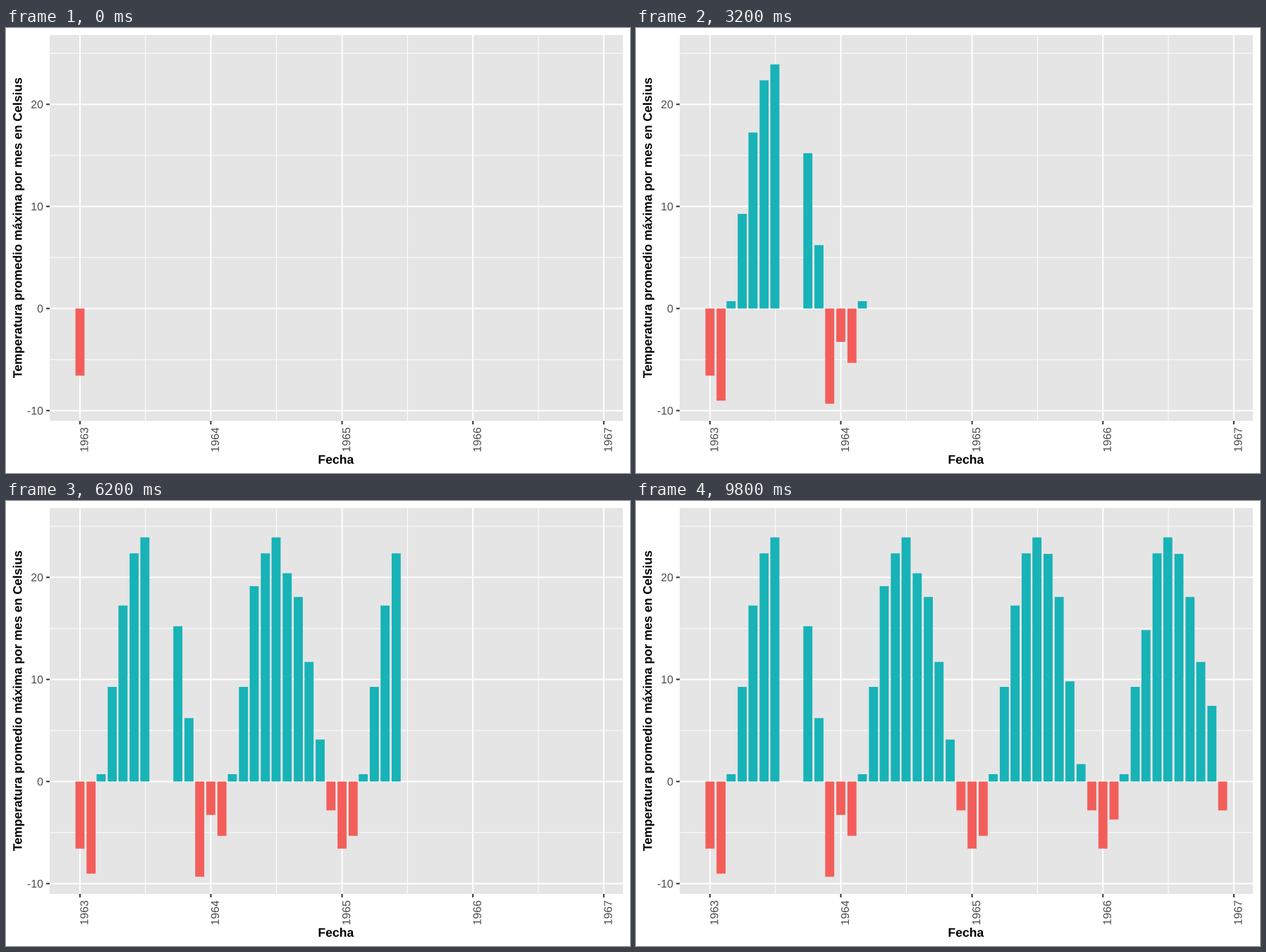
A matplotlib script for the animation above (10 s loop, 885 px wide and 632 px high).

```python
import matplotlib.pyplot as plt
import numpy as np
from matplotlib.animation import FuncAnimation
from matplotlib.patches import PathPatch, Rectangle
from matplotlib.textpath import TextPath
from matplotlib.transforms import Affine2D

W, H, DPI = 885, 632, 100
PT = 72 / DPI  # points per pixel
STEP, LOOP = 100, 10000  # ms

LEFT, RIGHT, TOP, BOTTOM = 62, 875, 10, 558
ZERO, DEGREE = 398.4, 14.5
X0, DAY = 104.9, 0.5085
BAR = 0.9 * 28 * DAY

PANEL, WARM, COLD = "#E5E5E5", "#17B3B7", "#F35E5A"
TICK, LABEL = "#333333", "#4D4D4D"

MISSING = ("1963-08", "1963-09")
# Months clearly off the seasonal curve, in degrees.
ANOMALIES = {
    "1963-02": -3.7, "1963-10": 3.5, "1963-11": 2.1, "1963-12": -6.5,
    "1964-01": 3.3, "1964-05": 1.9, "1964-08": -1.9, "1965-10": -1.9,
    "1965-11": -2.4, "1966-02": 1.6, "1966-05": -2.4, "1966-11": 3.3,
}

fig = plt.figure(figsize=(W / DPI, H / DPI), dpi=DPI, facecolor="white")
ax = fig.add_axes([0, 0, 1, 1])
ax.set_xlim(0, W)
ax.set_ylim(H, 0)
ax.axis("off")


def x_of(date):
    days = np.datetime64(date, "D") - np.datetime64("1963-01-01")
    return X0 + days.astype(int) * DAY


def y_of(temp):
    return ZERO - temp * DEGREE


def season(k):
    """Yearly cycle of the maximum, k months after a January."""
    a = 2 * np.pi * k / 12
    return 9.58 - 15.29 * np.cos(a - 0.08) - 1.17 * np.cos(2 * a - 0.68)


def line(xs, ys, width, color="white"):
    ax.plot(xs, ys, color=color, lw=width * PT, solid_capstyle="butt",
            snap=False, zorder=2)


def text(x, y, s, size, color="black", weight="normal", align=0.5, angle=0):
    """Draw s on a baseline; align 0.5 centres its ink on (x, y), 1 ends it there."""
    path = TextPath((0, 0), s, size=size,
                    prop={"family": "Liberation Sans", "weight": weight})
    ink = path.get_extents()
    place = (Affine2D().translate(-ink.x0 - align * ink.width, 0)
             .scale(1, -1).rotate_deg(-angle).translate(x, y))
    ax.add_patch(PathPatch(path, transform=place + ax.transData,
                           facecolor=color, lw=0, snap=False, zorder=4))


def box(x, y, w, h, color, zorder):
    return ax.add_patch(Rectangle((x, y), w, h, facecolor=color, lw=0,
                                  snap=False, zorder=zorder))


box(LEFT, TOP, RIGHT - LEFT, BOTTOM - TOP, PANEL, 1)

years = range(1963, 1968)
ticks = [x_of(f"{year}-01-01") for year in years]

for temp in range(-5, 26, 10):
    line([LEFT, RIGHT], [y_of(temp)] * 2, 1)
for a, b in zip(ticks, ticks[1:]):
    line([(a + b) / 2] * 2, [TOP, BOTTOM], 1)

for temp in range(-10, 21, 10):
    y = y_of(temp)
    line([LEFT, RIGHT], [y, y], 2)
    line([LEFT - 5, LEFT], [y, y], 2, TICK)
    text(52.3, y + 5.6, str(temp), 15.9, LABEL, align=1)
for year, x in zip(years, ticks):
    line([x, x], [TOP, BOTTOM], 2)
    line([x, x], [BOTTOM, BOTTOM + 5], 2, TICK)
    text(x + 11.5, 584.5, str(year), 15.9, LABEL, angle=90)

text((LEFT + RIGHT) / 2, 618.8, "Fecha", 17.6, weight="bold")
text(22.4, (TOP + BOTTOM) / 2,
     "Temperatura promedio máxima por mes en Celsius", 17.6,
     weight="bold", angle=90)

bars = []
for k, month in enumerate(np.arange("1963-01", "1967-01", dtype="datetime64[M]")):
    name = str(month)
    temp = 0 if name in MISSING else season(k) + ANOMALIES.get(name, 0)
    bars.append(box(x_of(month) - BAR / 2, ZERO, BAR, -temp * DEGREE,
                    WARM if temp > 0 else COLD, 3))


def last_month(t):
    """Index of the newest bar: slow for the first months, then steady."""
    return (t + 100) // 300 if t < 1400 else 5 + (t - 1400) // 200


def update(i):
    last = last_month(i * STEP)
    for k, bar in enumerate(bars):
        bar.set_visible(k <= last)
    return bars


anim = FuncAnimation(fig, update, frames=LOOP // STEP, interval=STEP,
                     repeat=True, repeat_delay=0, blit=False)
plt.show()
```
